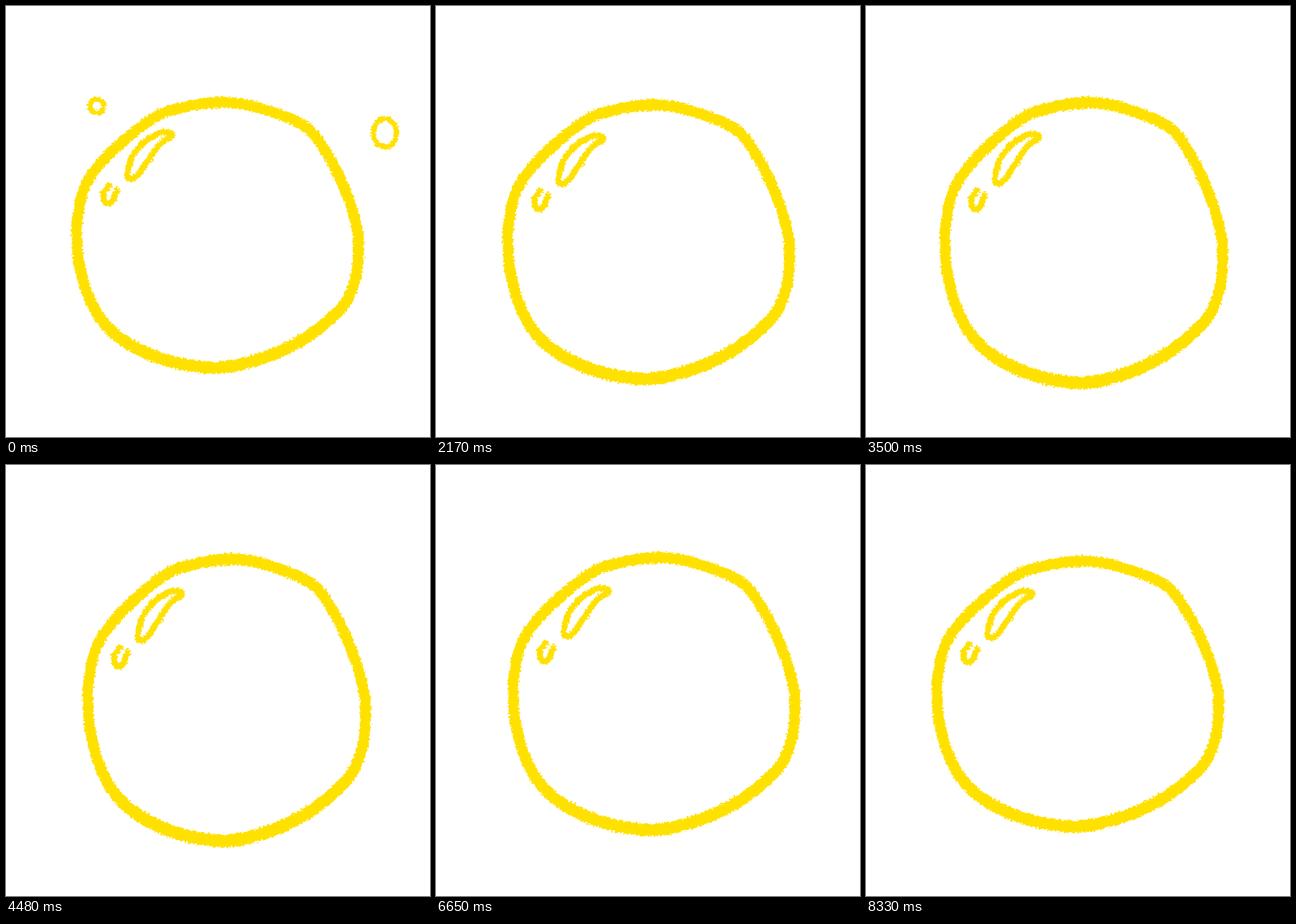
These frames come from a looping animation (742 px wide and 754 px high, 8400 ms). An HTML page:

```html
<!DOCTYPE html>
<html lang="en">
<head>
<meta charset="utf-8">
<title>Bubble</title>
<style>
html, body { margin: 0; width: 100%; height: 100%; overflow: hidden; background: #fff; }
svg { display: block; width: 100%; height: 100%; }
path { fill: none; stroke: #ffe100; stroke-linecap: round; stroke-linejoin: round; }
</style>
</head>
<body>
<svg viewBox="0 0 742 754">
  <filter id="crayon" filterUnits="userSpaceOnUse" x="0" y="0" width="742" height="754" color-interpolation-filters="sRGB">
    <feTurbulence type="fractalNoise" baseFrequency=".28" numOctaves="2" seed="4"/>
    <feDisplacementMap in="SourceGraphic" scale="9" xChannelSelector="R" yChannelSelector="G"/>
    <feComponentTransfer><feFuncA type="linear" slope="3" intercept="-1"/></feComponentTransfer>
  </filter>
  <g id="bubble" filter="url(#crayon)">
    <path id="rim" stroke-width="18.5"/>
    <!-- A slightly taller copy thickens the lower edge. -->
    <use href="#rim" transform="translate(0 -1) scale(1 1.006)"/>
    <path id="shine" stroke-width="10.5"/>
    <path id="glint" stroke-width="10.5"/>
  </g>
  <path id="extra" stroke-width="9" filter="url(#crayon)"/>
</svg>
<script>
const LOOP = 8400, STEP = 70;
const EXTRA_CYCLE = 4550, EXTRA_HOLD = 420;
const $ = id => document.getElementById(id);

// Smooth path through a flat list of x, y pairs.
function curve(c, closed = true) {
  const n = c.length / 2;
  const at = i => {
    const k = closed ? (i + n) % n : Math.max(0, Math.min(n - 1, i));
    return [c[2 * k], c[2 * k + 1]];
  };
  let d = 'M' + at(0);
  for (let i = 0; i < n - !closed; i++) {
    const [a, b, e, f] = [at(i - 1), at(i), at(i + 1), at(i + 2)];
    const p = b.map((v, k) => v + (e[k] - a[k]) / 6);
    const q = e.map((v, k) => v - (f[k] - b[k]) / 6);
    d += `C${p} ${q} ${e}`;
  }
  return d + (closed ? 'Z' : '');
}

const ring = (x, y, rx, ry = rx) =>
  `M${x - rx} ${y}a${rx} ${ry} 0 1 1 ${2 * rx} 0a${rx} ${ry} 0 1 1 ${-2 * rx} 0Z`;

// Short rays around a centre, each given as [degrees, outer radius].
const burst = (x, y, rays) => rays.map(([deg, r]) => {
  const a = deg * Math.PI / 180;
  const point = d => `${x + d * Math.cos(a)} ${y + d * Math.sin(a)}`;
  return `M${point(r)}L${point(r - 16)}`;
}).join('');

$('rim').setAttribute('d', curve([
  385,169, 445,179, 520,208, 560,254, 600,336, 618,415, 603,503, 548,563,
  465,609, 365,631, 255,609, 172,553, 131,460, 128,355, 162,280, 255,199, 320,176]));
$('shine').setAttribute('d', curve([286,222, 291,229, 270,242, 231,296, 214,299, 219,270, 239,242, 268,223]));
$('glint').setAttribute('d', curve([182,314, 171,328, 175,344, 186,343, 195,322], false));

// Successive drawings beside the bubble; afterwards they rest.
const extras = [
  ring(159, 175, 12) + ring(663, 222, 20, 25),
  ring(152, 182, 19) + ring(664, 219, 31, 34),
  burst(130, 200, [[-115, 46], [-44, 42], [15, 32], [68, 38], [113, 41], [170, 39]]) +
    burst(650, 213, [[-92, 46], [-25, 40], [57, 50], [102, 48], [144, 46], [206, 33]]),
  ring(111, 140, 13) + ring(663, 119, 15),
];
extras.push(extras[3]);

// Sine wave that reaches its maximum at time `peak`.
const wave = (t, amp, peak, period = LOOP) => amp * Math.cos((t - peak) / period * 2 * Math.PI);

function draw(now) {
  const t = Math.floor(now % LOOP / STEP) * STEP;
  const middle = 379 + wave(t, 9.5, 5100);
  const top = 157 + wave(t, 6, 1750);
  const bottom = 659 + wave(t, 13.5, 3600) + wave(t, 1.5, 1400, LOOP / 3);
  const width = 511 - 8 * Math.exp(-(((t - 3990) / 900) ** 4));
  const sx = width / 511, sy = (bottom - top) / 486;
  $('bubble').setAttribute('transform',
    `translate(${middle} ${top}) scale(${sx} ${sy}) translate(-372.5 -159)`);
  $('extra').setAttribute('d', extras[Math.floor(t % EXTRA_CYCLE / EXTRA_HOLD)] || '');
}

const start = performance.now();
function tick() {
  draw(performance.now() - start);
  requestAnimationFrame(tick);
}
tick();
</script>
</body>
</html>
```
